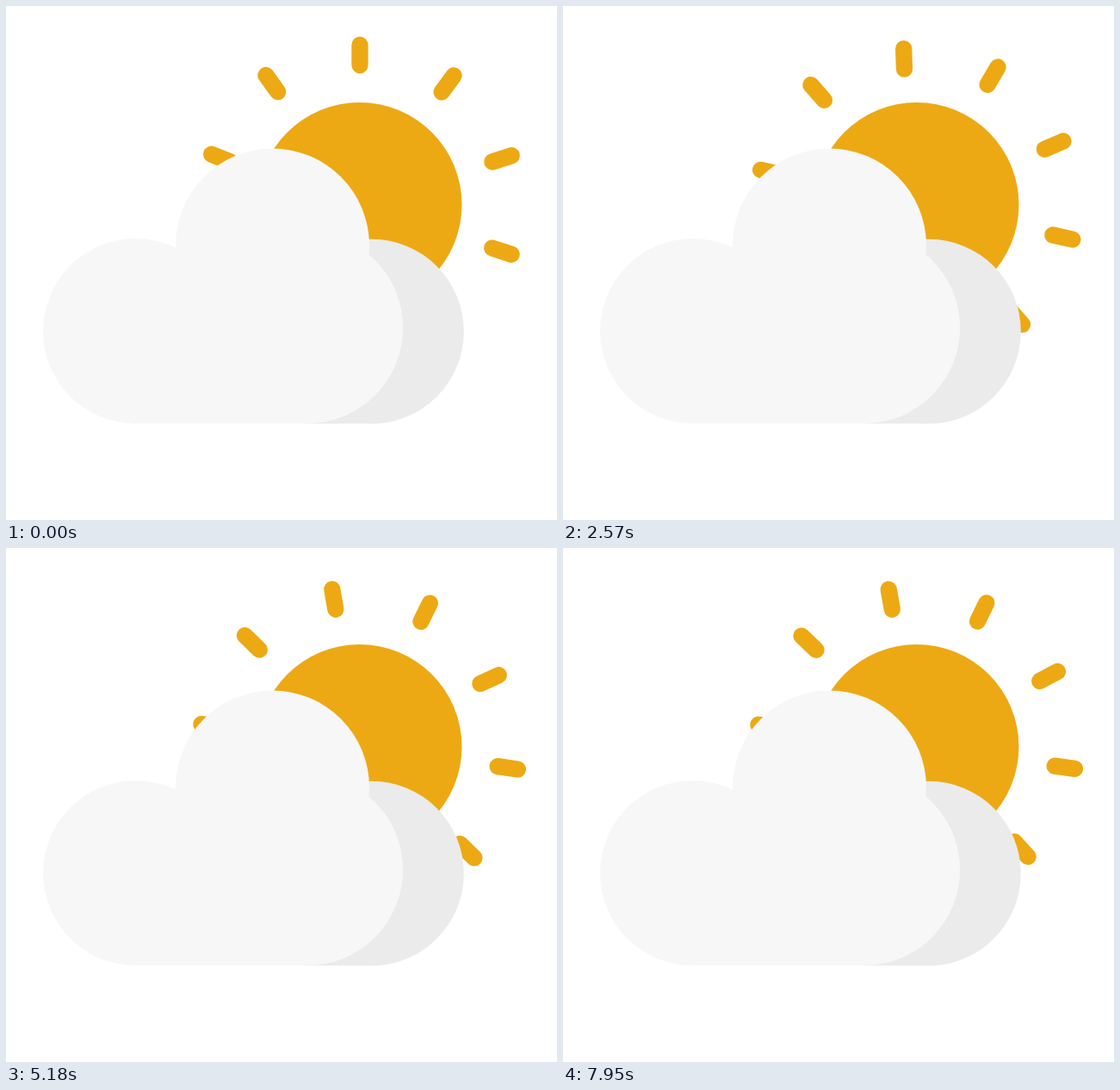
Animation, 640 px wide and 597 px high, one loop 8000 ms. Source, as an HTML page with a canvas:

```html
<!DOCTYPE html>
<html lang="en">
<head>
<meta charset="utf-8">
<title>Sun behind a cloud</title>
<style>
  html, body { margin: 0; width: 100%; height: 100%; overflow: hidden; background: #fff; }
  canvas { display: block; width: 640px; height: 597px; }
</style>
</head>
<body>
<canvas id="stage" width="640" height="597"></canvas>
<script>
const ctx = document.getElementById('stage').getContext('2d');
const LOOP = 8000, STEPS = 193, STEP_MS = LOOP / STEPS;
const DEG_PER_STEP = 1.072, START_DEG = 0.1;
const SUN = { x: 410.7, y: 230.8, r: 118.8 };
const GOLD = '#eda914', FRONT = '#f7f7f7', BACK = '#ebebeb';
const RAYS = 10, RAY_WIDTH = 19.3, RAY_HALF = 11.8;
const rad = deg => deg * Math.PI / 180;

function disc(x, y, r, color) {
  ctx.fillStyle = color;
  ctx.beginPath();
  ctx.arc(x, y, r, 0, Math.PI * 2);
  ctx.fill();
}

// Angles are clockwise from straight up; tilt turns the ray about its middle.
function ray(deg, dist, tilt) {
  const x = SUN.x + dist * Math.sin(rad(deg));
  const y = SUN.y - dist * Math.cos(rad(deg));
  const dx = RAY_HALF * Math.sin(rad(deg + tilt));
  const dy = -RAY_HALF * Math.cos(rad(deg + tilt));
  ctx.beginPath();
  ctx.moveTo(x - dx, y - dy);
  ctx.lineTo(x + dx, y + dy);
  ctx.stroke();
}

function drawSun(turn) {
  disc(SUN.x, SUN.y, SUN.r, GOLD);
  ctx.strokeStyle = GOLD;
  ctx.lineWidth = RAY_WIDTH;
  ctx.lineCap = 'round';
  for (let i = 0; i < RAYS; i++) {
    const deg = turn + i * 360 / RAYS;
    // One ray sits slightly inward and askew.
    if (i === 8) ray(deg + 0.5, 170, 3);
    else ray(deg, 173.8, 0);
  }
}

function drawCloud() {
  disc(424.6, 378, 107.2, BACK);
  ctx.fillRect(340, 380, 84.6, 105);
  disc(150.5, 377.5, 107.4, FRONT);
  disc(309.5, 278, 112.5, FRONT);
  disc(349.8, 373.7, 111.3, FRONT);
  ctx.fillRect(150.5, 300, 199.3, 185);
}

function frame() {
  const t = performance.now() % LOOP;
  const step = Math.floor((t + 10) / STEP_MS) % STEPS;
  ctx.fillStyle = '#fff';
  ctx.fillRect(0, 0, 640, 597);
  drawSun(START_DEG + step * DEG_PER_STEP);
  drawCloud();
  requestAnimationFrame(frame);
}
frame();
</script>
</body>
</html>
```
